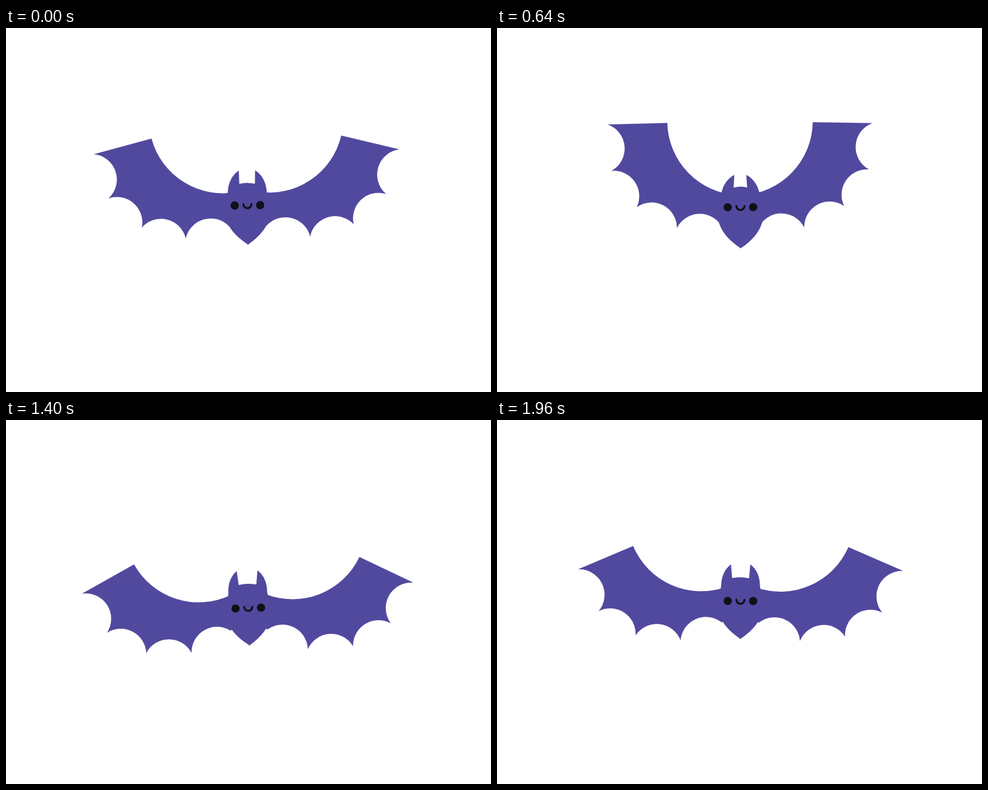
An HTML page with a canvas that plays this animation: 800 by 600 pixels, repeating every 2000 ms.

```html
<!DOCTYPE html>
<html lang="en">
<head>
<meta charset="utf-8">
<title>Flapping bat</title>
<style>
  html, body { margin: 0; width: 100%; height: 100%; overflow: hidden; background: #fff; }
  canvas { display: block; }
</style>
</head>
<body>
<canvas id="stage" width="800" height="600"></canvas>
<script>
const ctx = document.getElementById('stage').getContext('2d');
const LOOP = 2000, STEP = 40, FLAP = 505, RAD = Math.PI / 180;
const PURPLE = '#51499e', INK = '#121016';

// the picture rests from the first time to the second
const rests = [[0, 80], [400, 520], [560, 640], [1200, 1280]];

// right wing, raised, with the middle of the face as origin
const wing = new Path2D(`M4 -20 A122 122 0 0 0 120 -139.5 L218.5 -137.5
  A42 42 0 0 0 212.5 -61 A42 42 0 0 0 171 -1
  A42 42 0 0 0 105 34 A42 42 0 0 0 31 31.6 L10 30 Z`);
const shoulder = [21, 33];

const mix = (a, b, k) => a + (b - a) * k;
const wave = turns => Math.cos(2 * Math.PI * turns);

function stepTime(ms) {
  const t = Math.floor(ms % LOOP / STEP) * STEP;
  const rest = rests.find(([from, to]) => t >= from && t < to);
  return rest ? rest[0] : t;
}

// a regular flap and bob, with slow waves that let the bat drift and sway
function poseAt(t) {
  const flap = t / FLAP - 0.25, loop = t / LOOP;
  return {
    angle: 14.3 - 13.2 * wave(flap),
    x: 399.9 + 1.7 * wave((t - 640) / 440),
    y: 302.2 + 9 * wave(flap - 0.35) + 5.2 * wave(loop - 0.62) + 1.2 * wave(2 * loop),
    tilt: -0.8 + 1.1 * wave((t - 840) / 1140)
  };
}

function drawWing(side, angle) {
  ctx.save();
  ctx.scale(side, 1);
  ctx.translate(...shoulder);
  ctx.rotate((angle - 1.2) * RAD);
  ctx.translate(-shoulder[0], -shoulder[1]);
  ctx.fill(wing);
  ctx.restore();
}

// one half of the head and body; ears spread and the body rises as the wings go down
function drawHalf(side, down) {
  const tipX = mix(9.5, 17, down), tipY = mix(-53, -55, down);
  ctx.save();
  ctx.scale(side, 1);
  ctx.translate(0, -6.5 * down);
  ctx.beginPath();
  ctx.moveTo(-1, 68);
  ctx.lineTo(0, 68);
  ctx.quadraticCurveTo(32, 47, 37, 20);
  ctx.lineTo(32, -20);
  ctx.quadraticCurveTo(mix(28, 32, down), -43, tipX, tipY);
  ctx.lineTo(mix(11, 14.5, down), -32);
  ctx.quadraticCurveTo(6, -33.5, -1, -33.5);
  ctx.fill();
  ctx.restore();
}

function drawFace() {
  ctx.fillStyle = ctx.strokeStyle = INK;
  for (const x of [-21, 21]) {
    ctx.beginPath();
    ctx.arc(x, 0, 6.8, 0, 2 * Math.PI);
    ctx.fill();
  }
  ctx.lineWidth = 3.3;
  ctx.lineCap = 'round';
  ctx.beginPath();
  ctx.arc(0, -2, 6.7, 0, Math.PI);
  ctx.stroke();
}

function draw(ms) {
  const { angle, x, y, tilt } = poseAt(stepTime(ms));
  ctx.clearRect(0, 0, 800, 600);
  ctx.save();
  ctx.translate(x, y);
  ctx.rotate(tilt * RAD);
  ctx.fillStyle = PURPLE;
  for (const side of [-1, 1]) {
    drawWing(side, angle);
    drawHalf(side, angle / 27);
  }
  drawFace();
  ctx.restore();
}

const start = performance.now();
function tick() {
  draw(performance.now() - start);
  requestAnimationFrame(tick);
}
tick();
</script>
</body>
</html>
```
